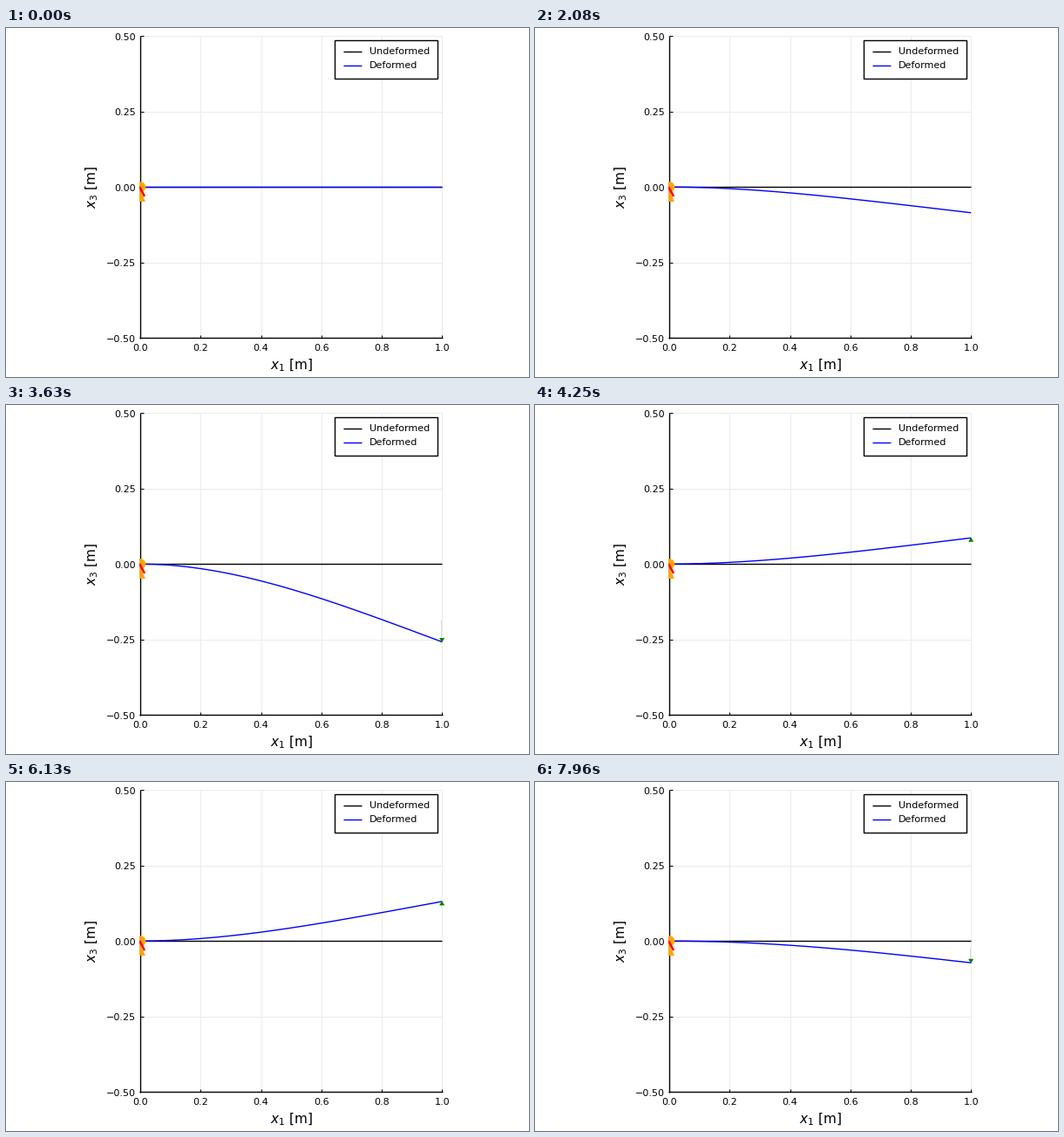
Recreate the animation shown at these times as a matplotlib script. Size 600x400 px, loop 8 s.

```python
import numpy as np
import matplotlib.pyplot as plt
from matplotlib.animation import FuncAnimation
from matplotlib.patches import Circle, Polygon, Rectangle

W, H, DPI = 600, 400, 100
FRAMES, INTERVAL = 400, 20
RATE = 24  # motion steps per second
X0, Y0, SCALE = 154.15, 182.2, 346.0
X1, TOP, BOTTOM = X0 + SCALE, Y0 - SCALE / 2, Y0 + SCALE / 2
BLUE, ORANGE = "#0000ff", "#ffa500"

plt.rcParams["font.family"] = "DejaVu Sans"
plt.rcParams["mathtext.fontset"] = "dejavusans"

fig = plt.figure(figsize=(W / DPI, H / DPI), dpi=DPI, facecolor="white")
ax = fig.add_axes([0, 0, 1, 1])
ax.set_xlim(0, W)
ax.set_ylim(H, 0)
ax.axis("off")


def pt(px):
    return px * 72 / DPI


def line(xs, ys, color, width, z=2):
    return ax.plot(xs, ys, color=color, lw=pt(width), zorder=z,
                   solid_capstyle="butt")[0]


def label(x, y, text, size=8, ha="left", **kw):
    ax.text(x, y, text, fontsize=size, ha=ha, va="baseline", zorder=9, **kw)


# Grid, ticks and axis lines
for i in range(6):
    x = X0 + i * SCALE / 5
    line([x, x], [TOP, BOTTOM], "#ebebeb", 1, 0)
    line([x, x], [BOTTOM, BOTTOM - 3.5], "black", 1, 5)
    label(x, 370.4, f"{i / 5:.1f}", ha="center")
for i in range(5):
    y = TOP + i * SCALE / 4
    line([X0, X1], [y, y], "#ebebeb", 1, 0)
    line([X0, X0 + 3.5], [y, y], "black", 1, 5)
    label(148.7, y + 4.4, f"{0.5 - i / 4:.2f}".replace("-", "\u2212"), ha="right")
line([X0, X0], [TOP, BOTTOM + 0.7], "black", 1.39, 5)
line([X0 - 0.7, X1 + 0.5], [BOTTOM, BOTTOM], "black", 1.39, 5)
label(327.5, 391, "$x_1$ [m]", 11, "center")
label(103.4, Y0, "$x_3$ [m]", 11, "center", rotation=90, rotation_mode="anchor")

# Legend
ax.add_patch(Rectangle((377.3, 14.3), 118, 44, fc="white", ec="black",
                       lw=pt(1.39), zorder=8))
for y, color, text in ((27.3, "black", "Undeformed"), (43.3, BLUE, "Deformed")):
    line([386.5, 408], [y, y], color, 1.39, 9)
    label(417, y + 3.2, text)

# Clamp at the root
clip = Rectangle((153, 0), W, H, transform=ax.transData)
clamp = [
    Circle((X0, Y0), 6, fc=ORANGE, lw=0, zorder=6),
    Polygon([(X0, 187), (148.5, 199), (160, 199)], fc=ORANGE, lw=0, zorder=6),
]
for part in clamp:
    ax.add_patch(part)
    part.set_clip_path(clip)
red = line([X0 - 1, 159], [182, 193], "red", 2.5, 7)
red.set_clip_path(clip)

# Beam and tip load
s = np.linspace(0, 1, 21)
static = (3 * s**2 - s**3) / 2


def first_mode(s):
    b = 1.8751041
    r = (np.cosh(b) + np.cos(b)) / (np.sinh(b) + np.sin(b))
    return (np.cosh(b * s) - np.cos(b * s) - r * (np.sinh(b * s) - np.sin(b * s))) / 2


mode = first_mode(s)
forced = 0.85 * static + 0.15 * mode

line([X0, X1], [Y0, Y0], "black", 1.39, 3)
beam = line(X0 + SCALE * s, Y0 + 0 * s, BLUE, 1.39, 4)
shaft = line([], [], "#d9d9d9", 1, 3)
head = Polygon([(0, 0)] * 3, fc="#008000", lw=0, zorder=6)
ax.add_patch(head)


def update(i):
    # Steps start on a 10 ms grid, so look slightly ahead
    step = int((i * INTERVAL + 15) * RATE / 1000)
    phase = 2 * np.pi * step / 100
    load = np.sin(phase)
    w = 81.5 * load * forced - 30.1 * np.sin(2.562 * phase) * mode
    beam.set_ydata(Y0 - w)
    tip = Y0 - w[-1]
    shown = abs(load) > 1e-6
    shaft.set_visible(shown)
    head.set_visible(shown)
    d = np.sign(load)
    shaft.set_data([499.2, 499.2], [tip, tip + 0.1 * SCALE * load])
    head.set_xy([(X1, tip - 0.8 * d), (X1 - 3, tip + 4.4 * d), (X1 + 3, tip + 4.4 * d)])
    return beam, shaft, head


anim = FuncAnimation(fig, update, frames=FRAMES, interval=INTERVAL,
                     init_func=lambda: update(0), repeat=True, repeat_delay=0)
plt.show()
```
